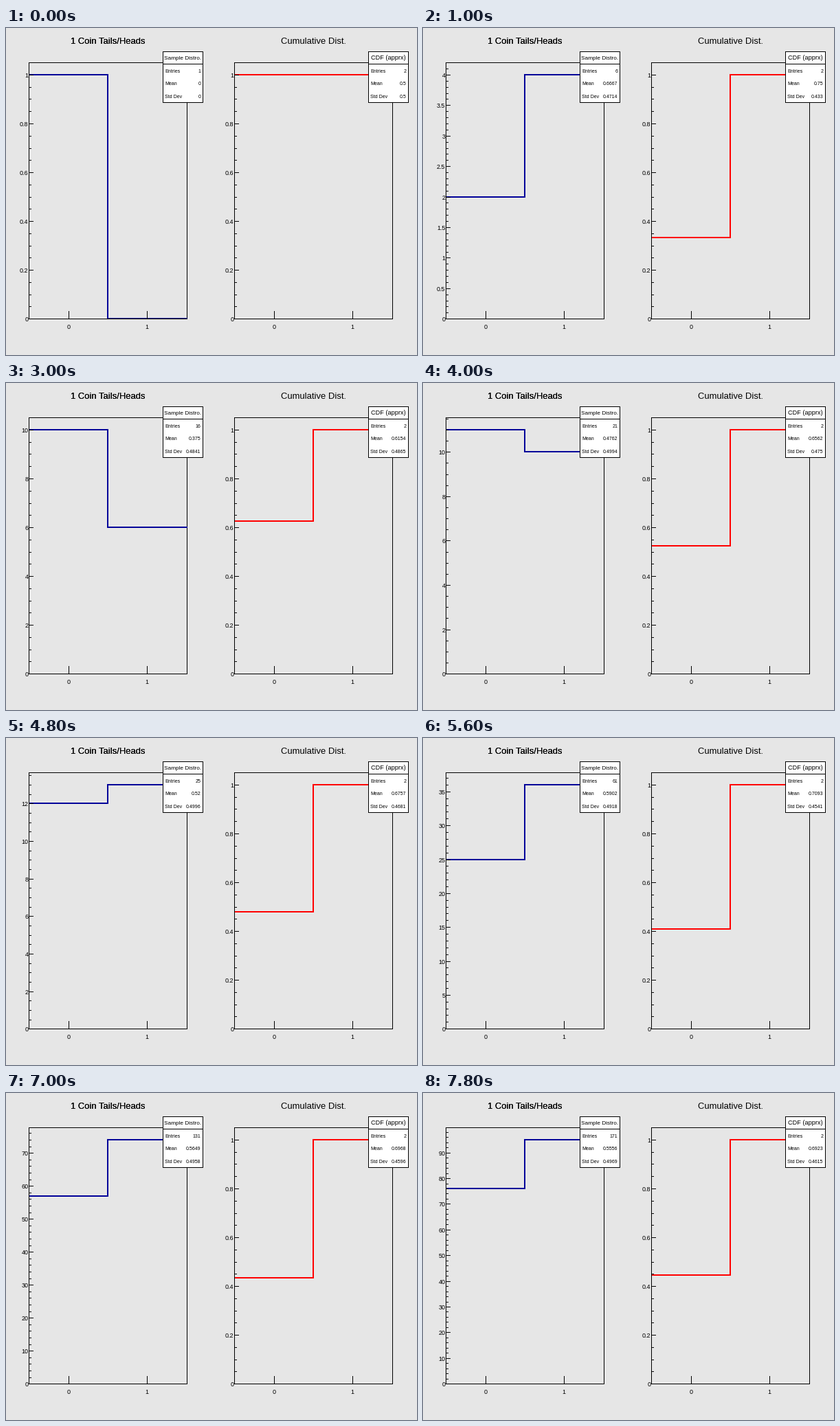
Recreate the animation shown at these times as a matplotlib script. Size 598 px wide and 476 px high, loop 8000 ms.

```python
import math

import matplotlib.pyplot as plt
from matplotlib.animation import FuncAnimation

W, H, DPI = 598, 476, 64
PT = 72 / DPI                      # points per pixel
TOP, BOTTOM, SPAN = 50, 423, 230   # plot frame, in pixel rows and columns
BLUE, RED, BACK = "#000099", "#ff0000", "#e6e6e6"

# One toss per frame at first, then ten per frame.
TOSSES = "THHHTHTHTTHTTTTTHHHTHHHTH"
HEADS = [17, 23, 29, 36, 43, 47, 52, 58, 64, 70, 74, 80, 85, 91, 95]
FRAMES = len(TOSSES) + len(HEADS)

plt.rcParams["font.family"] = "Liberation Sans"
fig = plt.figure(figsize=(W / DPI, H / DPI), dpi=DPI, facecolor=BACK)
ax = fig.add_axes([0, 0, 1, 1])


def counts(i):
    """Number of tails and heads after step i."""
    if i < len(TOSSES):
        seen = TOSSES[:i + 1]
        return seen.count("T"), seen.count("H")
    k = i - len(TOSSES)
    return 31 + 10 * k - HEADS[k], HEADS[k]


def path(xs, ys, color="black", width=1, z=1):
    ax.plot(xs, ys, color=color, lw=width * PT, snap=False, zorder=z,
            solid_capstyle="butt", solid_joinstyle="miter")


def segments(segs, z=1):
    xs, ys = [], []
    for xa, ya, xb, yb in segs:
        xs += [xa, xb, math.nan]
        ys += [ya, yb, math.nan]
    path(xs, ys, z=z)


def hline(xa, xb, row):
    return xa, row + 0.5, xb + 1, row + 0.5


def vline(col, ya, yb):
    return col + 0.5, ya, col + 0.5, yb + 1


def text(x, y, s, size, ha="center"):
    ax.text(x, y, s, fontsize=size * PT, ha=ha, va="baseline", zorder=6)


def tick_step(limit):
    """Smallest 1-2-5 step giving at most ten divisions, and its subdivisions."""
    power = 10 ** math.floor(math.log10(limit / 10))
    for m in (1, 2, 5, 10):
        if limit / (m * power) <= 10 + 1e-9:
            return m * power, 4 if m == 2 else 5


def row_of(value, limit):
    return math.floor(423.7 - 373 * value / limit)


def axes_lines(x0, limit):
    right = x0 + SPAN
    segments([hline(x0, right, TOP), vline(right, TOP, BOTTOM)])
    marks = [hline(x0, right, BOTTOM), vline(x0, TOP, BOTTOM)]
    step, parts = tick_step(limit)
    for k in range(int(limit / step * parts + 1e-6) + 1):
        row = row_of(k * step / parts, limit)
        major = k % parts == 0
        marks.append(hline(x0, x0 + (6 if major else 3), row))
        if major:
            text(x0 - 0.6, row + 4, f"{k // parts * step:g}", 9, "right")
    for label, dx in (("0", 58), ("1", 172)):
        marks.append(vline(x0 + dx, 412, BOTTOM))
        text(x0 + dx, 438, label, 9)
    segments(marks, z=3)


def stat_box(x0, title, size, entries, mean):
    a, b = x0 + 195, x0 + 253
    ax.fill([a, b + 1, b + 1, a], [34, 34, 109, 109], color="white",
            lw=0, snap=False, zorder=4)
    segments([hline(a, b, r) for r in (34, 52, 108)]
             + [vline(c, 34, 108) for c in (a, b)], z=5)
    text(a + 29.5, 46, title, size)
    dev = math.sqrt(mean * (1 - mean))
    rows = (("Entries", entries, 65), ("Mean", mean, 83), ("Std Dev", dev, 102))
    for name, value, y in rows:
        text(a + 3, y, name, 7, "left")
        text(a + 55.5, y, f"{value:.4g}", 7, "right")


def histogram(x0, low, high, color):
    limit = 1.05 * max(low, high)
    axes_lines(x0, limit)
    ya, yb = row_of(low, limit), row_of(high, limit)
    mid = x0 + SPAN // 2
    path([x0, mid, mid, x0 + SPAN + 1], [ya, ya, yb, yb], color, 2, z=2)


def draw(i):
    ax.clear()
    ax.set_xlim(0, W)
    ax.set_ylim(H, 0)
    ax.axis("off")
    tails, heads = counts(i)
    total = tails + heads

    for _ in range(2):  # overprinted title looks heavier
        text(148, 23, "1 Coin Tails/Heads", 13)
    histogram(33, tails, heads, BLUE)
    stat_box(33, "Sample Distro.", 8.2, total, heads / total)

    text(447.5, 23, "Cumulative Dist.", 13)
    histogram(332, tails / total, 1, RED)
    stat_box(332, "CDF (apprx)", 9.1, 2, 1 / (1 + tails / total))
    return []


anim = FuncAnimation(fig, draw, frames=FRAMES, init_func=lambda: draw(0),
                     interval=200, repeat=True, repeat_delay=0)
plt.show()
```
